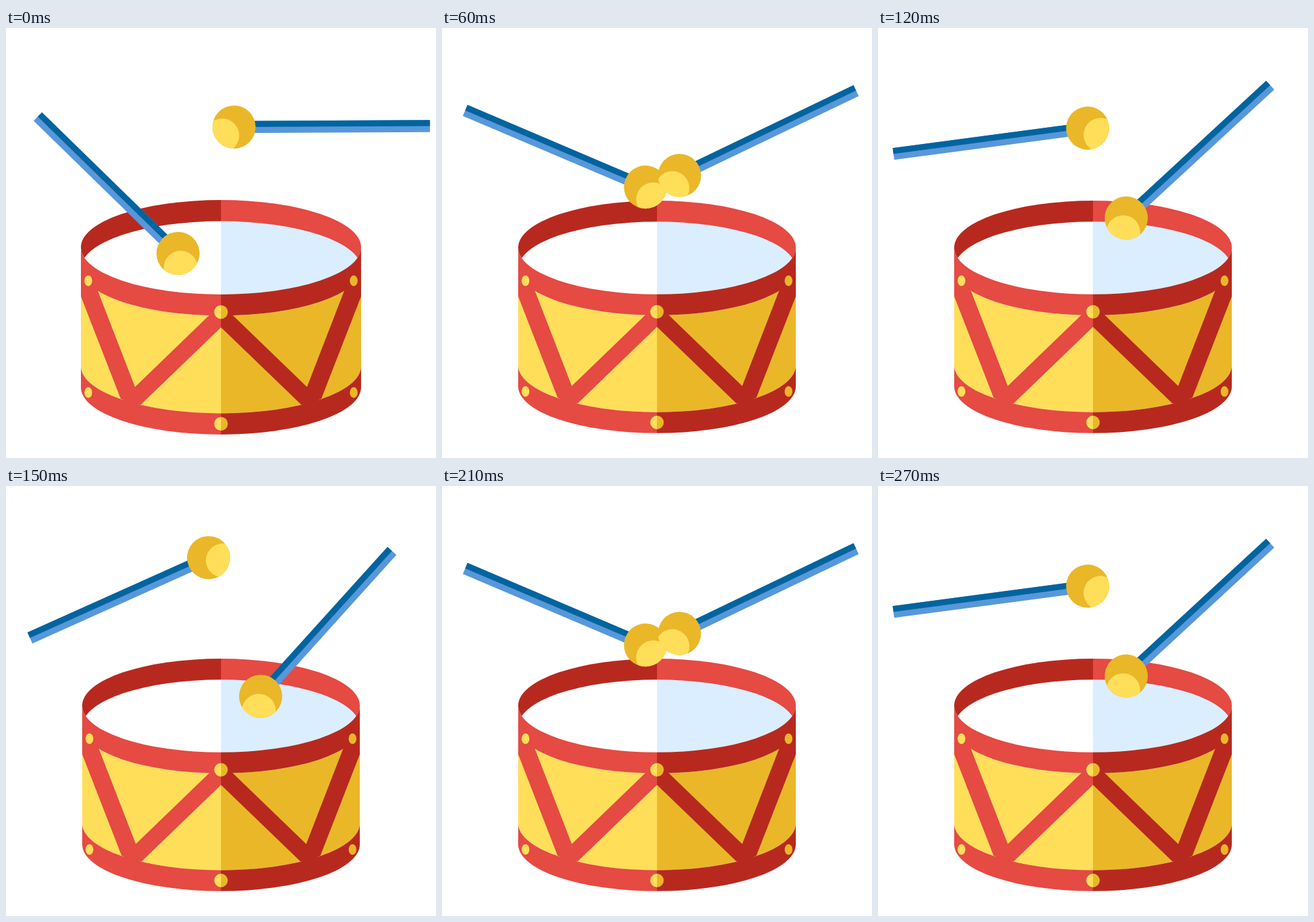
Recreate the animation shown at these times as an HTML page with a canvas. Size 660x660 px, loop 300 ms.

```html
<!DOCTYPE html>
<html>
<head>
<meta charset="utf-8">
<title>Drum</title>
<style>
  html, body { margin: 0; height: 100%; overflow: hidden; background: #fff; }
  canvas { display: block; width: 660px; height: 660px; }
</style>
</head>
<body>
<canvas width="660" height="660"></canvas>
<script>
const ctx = document.querySelector('canvas').getContext('2d');
const STEP = 30, TICKS = 10, LAST_POSE = 5;
const RED = '#e54a43', DARK_RED = '#b7291e';
const YELLOW = '#ffde5a', GOLD = '#eab729';
const BLUE = '#5797da', DARK_BLUE = '#00649f';
const RX = 215, RY = 72.5, RIM = 336.5, DEPTH = 32.5, BASE = 551.5;

function bezier(t, a, b, c, d) {
  const s = 1 - t;
  return a * s ** 3 + 3 * b * s * s * t + 3 * c * s * t * t + d * t ** 3;
}

function shape(color, build) {
  ctx.fillStyle = color;
  ctx.beginPath();
  build();
  ctx.fill();
}

function ellipse(color, x, y, rx, ry = rx) {
  shape(color, () => ctx.ellipse(x, y, rx, ry, 0, 0, 2 * Math.PI));
}

function polygon(color, ...points) {
  shape(color, () => points.forEach(p => ctx.lineTo(...p)));
}

// Part of the drum side between two parallel curved edges.
function band(color, top, bottom) {
  shape(color, () => {
    ctx.ellipse(0, top, RX, RY, 0, Math.PI, Math.PI / 2, true);
    ctx.ellipse(0, bottom, RX, RY, 0, Math.PI / 2, Math.PI);
  });
}

function drumHalf(side, front, back, wall, head) {
  ctx.save();
  ctx.scale(side, 1);
  ctx.beginPath();
  ctx.rect(-330, 0, 330, 660);
  ctx.clip();
  ellipse(back, 0, RIM, RX, RY);
  ellipse(head, 0, RIM + DEPTH, RX, RY);
  band(wall, RIM + DEPTH, BASE - DEPTH);
  polygon(front, [-215, 365], [-215, 412], [-154, 569], [-138, 577], [-123, 578],
    [0, 459.5], [0, 423.5], [-132, 551], [-204, 365]);
  band(front, RIM, RIM + DEPTH);
  band(front, BASE - DEPTH, BASE);
  for (const y of [388, 559.5]) {
    ellipse(wall, -203.7, y, 6, 8.2);
    ellipse(wall, 0, y + 48, 10.5);
  }
  ctx.restore();
}

function drum(scale) {
  ctx.save();
  ctx.translate(330, 384);
  ctx.scale(scale, scale);
  ctx.translate(0, -384);
  drumHalf(1, RED, DARK_RED, YELLOW, '#fff');
  drumHalf(-1, DARK_RED, RED, GOLD, '#dbeeff');
  ctx.restore();
}

// The right mallet is the left one mirrored; tilt is in degrees below level.
function mallet(side, x, y, tilt) {
  ctx.save();
  ctx.translate(x, y);
  ctx.scale(side, 1);
  ctx.rotate(tilt * Math.PI / 180);
  ctx.fillStyle = BLUE;
  ctx.fillRect(-300.7, -9.2, 300, 18.4);
  ctx.fillStyle = DARK_BLUE;
  ctx.fillRect(-300.7, -9.2, 300, 9.2);
  ellipse(GOLD, 0, 0, 33.1);
  ctx.clip();
  ellipse(YELLOW, 18.2, 12.8, 26);
  ctx.restore();
}

function draw(now) {
  // One full stroke, then the same stroke again without its two ends.
  const tick = Math.floor(now / STEP) % TICKS;
  const pose = tick > LAST_POSE ? tick - LAST_POSE : tick;
  const t = pose / LAST_POSE;

  ctx.clearRect(0, 0, 660, 660);
  drum(pose % 3 ? 0.991 : 1);
  mallet(1, bezier(t, 264, 319.6, 338, 311), bezier(t, 346, 253.8, 183, 110),
    bezier(t, 44.3, 32.3, 3.6, -24.2));
  mallet(-1, bezier(t, 350, 362, 373.4, 390.8), bezier(t, 152, 219.3, 271.2, 322.8),
    bezier(t, 0.3, 24.7, 41.2, 47.9));
  requestAnimationFrame(draw);
}
draw(0);
</script>
</body>
</html>
```
